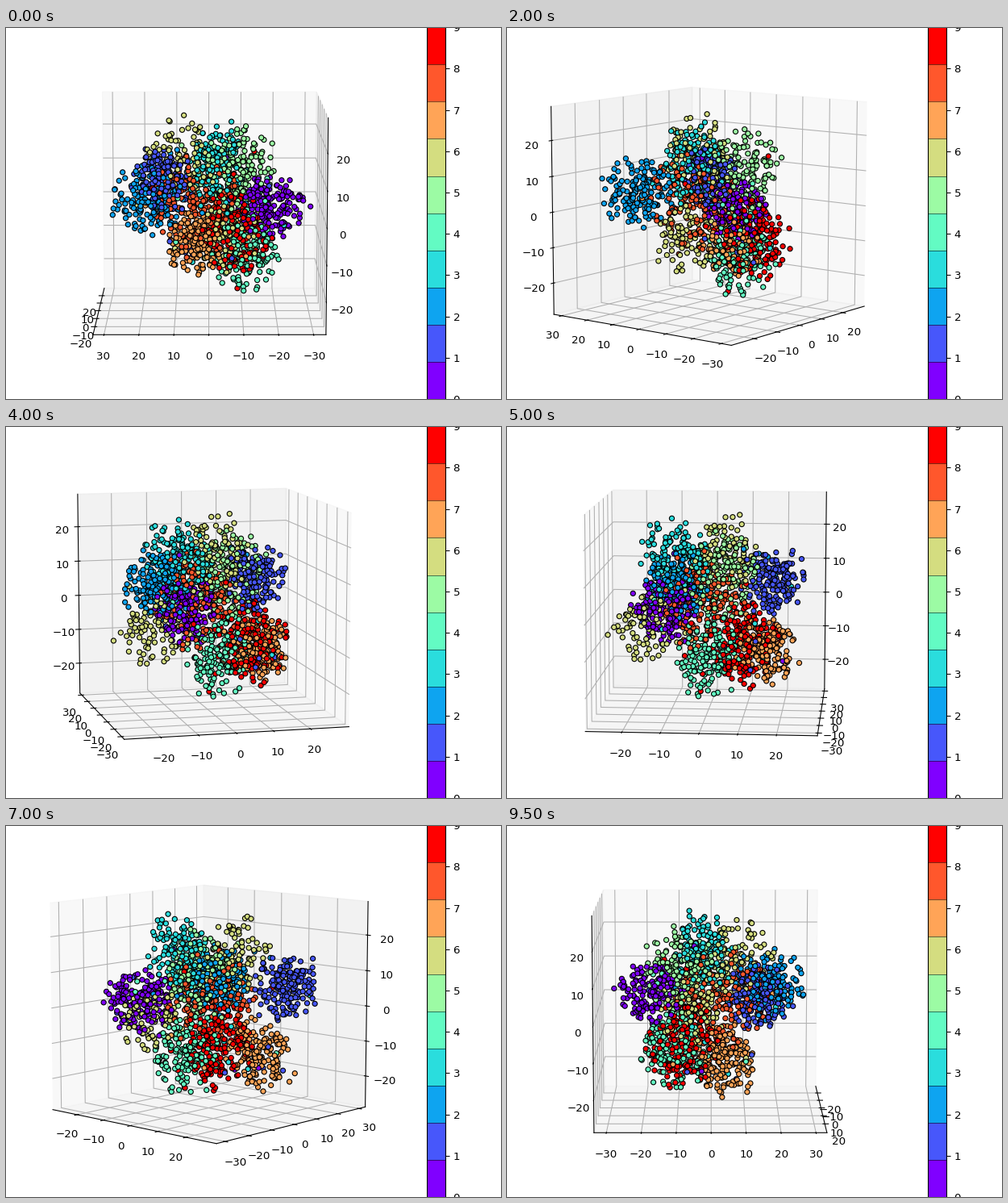
These frames come from a looping animation (614 by 460 pixels, 10 s). A matplotlib script:

```python
import matplotlib.pyplot as plt
import numpy as np
from matplotlib.animation import FuncAnimation
from mpl_toolkits.mplot3d import proj3d

WIDTH, HEIGHT, DPI = 614, 460, 96
FRAMES, INTERVAL = 20, 500
ELEVATION = 10
VIEW = (-0.095, 0.09)  # horizontal and vertical window of the projected scene
POINTS = 1797

# Data cube: middle and extent of x, y and z
MIDDLE = np.array([0.5, -0.2, 0.25])
EXTENT = np.array([57.6, 64.0, 56.0])

# Where the points of each label gather, in sides of the cube from its middle
CENTRES = [
    [(-0.19, -0.30, 0.04)],
    [(0.30, 0.24, 0.11)],
    [(-0.20, 0.29, 0.08)],
    [(-0.17, -0.04, 0.26)],
    [(0.01, -0.17, -0.24)],
    [(0.08, -0.15, 0.20)],
    [(-0.31, -0.10, -0.11), (0.08, 0.14, 0.26)],
    [(0.27, 0.07, -0.24)],
    [(-0.05, 0.06, 0.02)],
    [(0.18, -0.13, -0.17)],
]


def ball(rng, count):
    """Random points filling a unit ball, slightly denser in the middle."""
    direction = rng.normal(size=(count, 3))
    direction /= np.linalg.norm(direction, axis=1, keepdims=True)
    return direction * rng.random((count, 1)) ** 0.38


def make_cloud(seed=4):
    """Clusters reach towards the middle and are wider the nearer they are to it."""
    rng = np.random.default_rng(seed)
    labels = rng.permutation(np.arange(POINTS) % len(CENTRES))
    centres = np.array([rng.choice(CENTRES[label]) for label in labels])
    radius = 0.24 - 0.27 * np.linalg.norm(centres, axis=1, keepdims=True)
    points = centres * rng.uniform(0.75, 1.12, (POINTS, 1))
    points += ball(rng, POINTS) * radius * (1, 1, 1.25)
    strays = rng.random(POINTS) < 0.04
    labels[strays] = rng.integers(0, len(CENTRES), strays.sum())
    return MIDDLE + points * EXTENT, labels


def rect(left, width):
    """Full-height axes rectangle on a 6.4 x 4.8 inch layout."""
    scale = 6.4 * DPI / WIDTH
    return [left * scale, 0, width * scale, 4.8 * DPI / HEIGHT]


fig = plt.figure(figsize=(WIDTH / DPI, HEIGHT / DPI), dpi=DPI, facecolor="white")

# The cube is stretched to its rectangle instead of being kept square
box = fig.add_axes(rect(0, 0.8), projection="3d")
box.apply_aspect = lambda position=None: None
box.set_box_aspect((1, 1, 1), zoom=np.sqrt(3) / 1.8294640721620434)
box.set_xticks(range(-20, 21, 10))
box.set_yticks(range(-30, 31, 10))
box.set_zticks(range(-20, 21, 10))
low, high = MIDDLE - EXTENT * 25 / 48, MIDDLE + EXTENT * 25 / 48
box.set_xlim(low[0], high[0])
box.set_ylim(low[1], high[1])
box.set_zlim(low[2], high[2])

# Dots lie on a flat layer so that they keep their drawing order
layer = fig.add_axes(rect(0, 0.8))
layer.set_axis_off()
cloud, labels = make_cloud()
dots = layer.scatter(*cloud.T[:2], s=21, c=labels, vmin=0, vmax=9,
                     cmap=plt.get_cmap("rainbow", 10), edgecolors="black",
                     linewidths=0.85)
layer.set(xlim=VIEW, ylim=VIEW)

fig.colorbar(dots, cax=fig.add_axes(rect(0.85, 0.0375)), ticks=range(10),
             drawedges=True)

# Half a turn, a hair beyond each end so the side wall is well defined
azimuths = np.linspace(179.99, 360.01, FRAMES)


def update(frame):
    box.view_init(elev=ELEVATION, azim=azimuths[frame])
    x, y, _ = proj3d.proj_transform(*cloud.T, box.get_proj())
    dots.set_offsets(np.column_stack([x, y]))
    return [dots]


animation = FuncAnimation(fig, update, frames=FRAMES, interval=INTERVAL,
                          repeat=True, repeat_delay=0)
plt.show()
```
